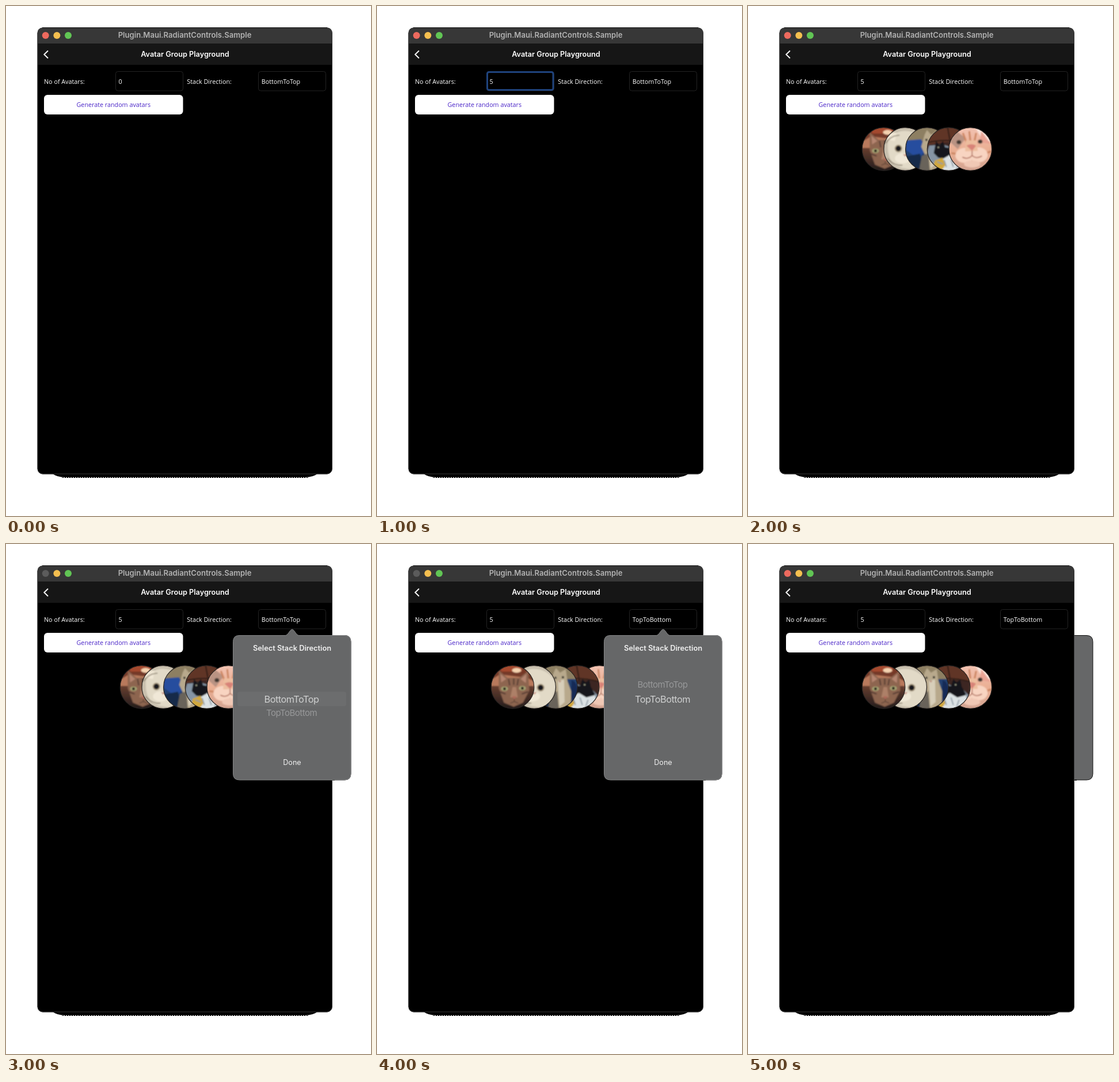
An HTML page for the animation above (6 s loop, 634 by 884 pixels).

```html
<!DOCTYPE html>
<html lang="en">
<head>
<meta charset="utf-8">
<title>Avatar Group Playground</title>
<style>
  html, body { margin: 0; width: 100%; height: 100%; overflow: hidden; background: #fff; }
  svg { display: block; width: 634px; height: 884px; }
  text { font: 10.75px "Open Sans", sans-serif; fill: #fff; white-space: pre; }
  .mid { text-anchor: middle; }
  .ui { font-family: Inter, sans-serif; }
  .bold { font-weight: 600; }
  .field { fill: #000; stroke: #232323; }
  .focus { fill: none; stroke: #1f437d; stroke-width: 3; }
  .picked { font-size: 16.3px; letter-spacing: -.5px; fill: #cfd0d0; }
  .other { font-size: 15px; letter-spacing: -.5px; fill: #98999a; }
</style>
</head>
<body>
<svg viewBox="0 0 634 884">
  <defs>
    <clipPath id="disc"><circle r="37.3"/></clipPath>
    <filter id="soft" x="-20%" y="-20%" width="140%" height="140%"><feGaussianBlur stdDeviation="1"/></filter>
    <linearGradient id="room" x2="0" y2="1">
      <stop stop-color="#7c3524"/><stop offset=".45" stop-color="#6b4030"/><stop offset="1" stop-color="#211b1c"/>
    </linearGradient>
    <linearGradient id="peach" x2="0" y2="1">
      <stop stop-color="#f3c3b2"/><stop offset=".55" stop-color="#e9ad91"/><stop offset="1" stop-color="#d2a493"/>
    </linearGradient>
    <path id="balloon" d="M405 158.5H485C490 158.5 493 148 497 148S504 158.5 509 158.5H588Q599 158.5 599 169.5V398Q599 409 588 409H405.500Q394.500 409 394.500 398V169.500Q394.500 158.500 405 158.500Z"/>
  </defs>

  <g data-steps="345">
    <use href="#balloon" fill="#666768" stroke="#111"/>
    <path d="M567 409.500H571" stroke="#000"/>
  </g>

  <!-- Window -->
  <path d="M80 810H542Q534 817 518 817H104Q88 817 80 810Z"/>
  <path d="M98 817.5H526" stroke="#000" stroke-dasharray="2 2"/>
  <rect x="54.5" y="37.500" width="512" height="774" rx="9.500"/>
  <path d="M55 65V47Q55 37.500 64.500 37.500H557Q566.500 37.500 566.500 47V65Z" fill="#373737"/>
  <path d="M55 65H566.500V102H55Z" fill="#161616"/>
  <rect x="55" y="38" width="511.500" height="773" rx="9" fill="none" stroke="#393939"/>
  <path d="M63 37.500H558" stroke="#111"/>
  <circle id="close" cx="68.700" cy="51" r="6"/>
  <circle cx="88.400" cy="51" r="6" fill="#f5bf4f"/>
  <circle cx="108" cy="51" r="6" fill="#61c554"/>
  <text class="ui bold mid" x="310.500" y="55.200" style="font-size:13.1px;fill:#b3b3b3">Plugin.Maui.RadiantControls.Sample</text>
  <path d="M73 77.500L66.300 84L73 90.500" fill="none" stroke="#fff" stroke-width="1.900"/>
  <text class="ui bold mid" x="311" y="88" style="font-size:12.7px">Avatar Group Playground</text>

  <!-- Form -->
  <text x="66" y="134.500">No of Avatars:</text>
  <rect class="field" x="190.500" y="113.500" width="117" height="33.500" rx="4"/>
  <rect class="focus" data-steps="1" x="191.500" y="114.500" width="114.500" height="31" rx="3"/>
  <text id="count" x="195.500" y="134.500"></text>
  <text x="314.300" y="134.500">Stack Direction:</text>
  <rect class="field" x="438.500" y="113.500" width="117" height="33.500" rx="4"/>
  <text id="direction" x="443.700" y="134.500"></text>
  <rect x="66" y="154" width="241.500" height="34" rx="6" fill="#fff"/>
  <text class="mid" x="186.800" y="175.200" style="fill:#4a25c8">Generate random avatars</text>

  <g id="avatars" data-steps="2345">
    <g>
      <path d="M-38-38H38V38H-38Z" fill="url(#room)"/>
      <path d="M-20-38H16V-27H-20Z" fill="#a4492f"/>
      <ellipse cx="7" cy="-29" rx="8" ry="4" fill="#f5d3b0"/>
      <path d="M-38-12L-22-22 26-16 38-9V-2H-38Z" fill="#b8795b"/>
      <path d="M-24 2L-24-29 -9-16H12L27-28 29 6 18 27 2 34-15 27Z" fill="#8d654f"/>
      <path d="M-21-23L-11-14-20-8ZM24-23L14-14 23-7Z" fill="#b58571"/>
      <path d="M-7-14L-5-3M2-15V-4M10-14L8-3M-23 8L-12 12M27 8L16 12" stroke="#523a31" stroke-width="2"/>
      <path d="M0 0L6 0 9 18H-4Z" fill="#ad8067"/>
      <ellipse cx="-14" cy="3" rx="6" ry="4" fill="#a7a675"/><ellipse cx="17" cy="2" rx="6" ry="4" fill="#a7a675"/>
      <circle cx="-14" cy="3" r="2.500" fill="#241d17"/><circle cx="17" cy="2" r="2.500" fill="#241d17"/>
      <path d="M-1 16H7L3 21Z" fill="#b0675a"/><path d="M3 21V25L-4 28M3 25L10 28" stroke="#442f28" fill="none"/>
    </g>
    <g>
      <path d="M-38-38H38V38H-38Z" fill="#c8bfad"/>
      <path d="M-30-14Q-18-34 5-31Q30-28 38-3L28 29Q8 40-18 28Q-33 15-30-14Z" fill="#e2dac7"/>
      <path d="M-35-17Q-28-31-15-28L-18-14Z" fill="#f1e8d6"/>
      <path d="M-34-10Q-25-24-10-24M-31 16Q-20 29-5 28" stroke="#817765" stroke-width="1.500" fill="none"/>
      <ellipse cx="-4" cy="16" rx="14" ry="9" fill="#f0e8d7"/>
      <circle cx="-12" cy="-1" r="6.500" fill="#a29277"/><circle cx="11" cy="1" r="6.500" fill="#a29277"/>
      <circle cx="-12" cy="-1" r="4.700" fill="#17191b"/><circle cx="11" cy="1" r="4.700" fill="#17191b"/>
      <path d="M-4 9H4L0 13Z" fill="#c48a7d"/>
    </g>
    <g>
      <path d="M-38-38H38V38H-38Z" fill="#243f70"/>
      <path d="M-38-38H38V-14H-38Z" fill="#8d7f62"/>
      <path d="M-36-15L-10-17-3 4-16 16-36 2Z" fill="#254e9e"/>
      <path d="M-38 13L-12 8-6 38H-38Z" fill="#182a49"/>
      <path d="M-4-25L0-33 7-25 17-31 20-10 27 9 25 38H2L-2 13-10-4Z" fill="#b8a98c"/>
      <path d="M3-11L14-13 15 26 6 34Z" fill="#d7ceb9"/>
      <path d="M-9 12L2 7 5 38H-14Z" fill="#69645a"/>
      <circle cx="-1" cy="-16" r="2" fill="#252822"/><circle cx="12" cy="-17" r="2" fill="#252822"/>
      <path d="M4-11H9L7-8Z" fill="#b67e6c"/>
      <path d="M27-12Q40-8 37 18L26 24Z" fill="#172c56"/>
    </g>
    <g>
      <path d="M-38-38H38V38H-38Z" fill="#3e2520"/>
      <path d="M-38-38H38V-9Q10-17-38-7Z" fill="#613527"/>
      <path d="M-2-38L3-11M-38-11Q0-20 38-9" stroke="#291c19" stroke-width="2" fill="none"/>
      <path d="M-34-6L-10-8 26 5 38 18V38H-38V9Z" fill="#8594a4"/>
      <path d="M-26 7L-22-14-16-7-10-14-6-3 4-2 8-14 14-8 20-13 23 0 30 12 25 22-2 17-18 15Z" fill="#18191b"/>
      <path d="M-12 18L2 10 15 18 30 14 34 38H-14Z" fill="#dce2e4"/>
      <path d="M-24 20L-11 15-5 27-13 38H-29Z" fill="#d1a83e"/>
      <path d="M-20 22L-10 26M-8 19L-4 31M4 18L8 31M18 22L14 34" stroke="#8d9aa5" stroke-width="2"/>
      <circle cx="-18" cy="-3" r="1.300" fill="#b5b59a"/><circle cx="12" cy="-4" r="1.300" fill="#b5b59a"/>
    </g>
    <g>
      <path d="M-38-38H38V38H-38Z" fill="url(#peach)"/>
      <path d="M-36-13L-24-31-8-19-22 0Z" fill="#b99383"/>
      <path d="M8-38H38V-12L20-18Z" fill="#f9e2d9"/>
      <path d="M16-12L19-31 35-9Z" fill="#e9a393"/>
      <path d="M-13-28L-7-12M-2-31L0-13M10-28L7-13M-33 7L-20 9M36 4L24 8" stroke="#cc8560" stroke-width="3"/>
      <ellipse cx="-10" cy="11" rx="16" ry="13" fill="#f8d4c1"/><ellipse cx="14" cy="10" rx="16" ry="13" fill="#f8d4c1"/>
      <path d="M-8-15H10L13 3-9 4Z" fill="#edbd9e"/>
      <ellipse cx="-20" cy="-12" rx="4" ry="3.500" fill="#423730"/><ellipse cx="17" cy="-13" rx="4" ry="3.500" fill="#423730"/>
      <path d="M-7-6Q2-11 10-6L3 3Z" fill="#d88378"/>
      <path d="M3 3V11Q-4 19-14 14M3 11Q10 18 20 12" fill="none" stroke="#a96453" stroke-width="1.500"/>
      <ellipse cx="3" cy="26" rx="14" ry="6" fill="#f0c8b5"/>
    </g>
  </g>

  <g data-steps="34">
    <use href="#balloon" fill="#666768" stroke="#858687"/>
    <text class="ui bold mid" x="497" y="185.300" style="font-size:12.8px;fill:#f0f0f0">Select Stack Direction</text>
    <rect data-steps="3" x="402" y="256" width="189" height="25" rx="4" fill="#6c6d6e"/>
    <text class="ui mid" id="bottomToTop" x="496">BottomToTop</text>
    <text class="ui mid" id="topToBottom" x="496">TopToBottom</text>
    <text class="ui mid" x="497" y="382.500" style="font-size:12.6px;fill:#f0f0f0">Done</text>
  </g>
</svg>

<script>
  const STEP = 1000, STEPS = 6;
  const byId = id => document.getElementById(id);
  const group = byId("avatars");
  const avatars = [...group.children].map((art, i) => wrapAvatar(art, 235.5 + i * 37.7));
  let shown = -1;

  function svgNode(name, attributes) {
    const node = document.createElementNS("http://www.w3.org/2000/svg", name);
    for (const key in attributes) node.setAttribute(key, attributes[key]);
    return node;
  }

  function wrapAvatar(art, x) {
    const avatar = svgNode("g", { transform: `translate(${x} 248)` });
    const clip = svgNode("g", { "clip-path": "url(#disc)" });
    art.setAttribute("filter", "url(#soft)");
    clip.append(art);
    avatar.append(clip, svgNode("circle", { r: 37.3, fill: "none", stroke: "#25211f", "stroke-width": 1.2 }));
    return avatar;
  }

  function setOption(id, picked, y) {
    byId(id).setAttribute("class", "ui mid " + (picked ? "picked" : "other"));
    byId(id).setAttribute("y", y);
  }

  function render(step) {
    const topFirst = step >= 4;
    for (const node of document.querySelectorAll("[data-steps]"))
      node.style.display = node.dataset.steps.includes(step) ? "" : "none";
    byId("count").textContent = step ? "5" : "0";
    byId("direction").textContent = topFirst ? "TopToBottom" : "BottomToTop";
    byId("close").setAttribute("fill", step === 3 || step === 4 ? "#5b5b5b" : "#ed6a5e");
    group.replaceChildren(...(topFirst ? [...avatars].reverse() : avatars));
    setOption("bottomToTop", !topFirst, topFirst ? 249.3 : 275.2);
    setOption("topToBottom", topFirst, topFirst ? 275.2 : 298.3);
  }

  function tick() {
    const step = Math.floor(performance.now() / STEP) % STEPS;
    if (step !== shown) render(shown = step);
    requestAnimationFrame(tick);
  }
  tick();
</script>
</body>
</html>
```
